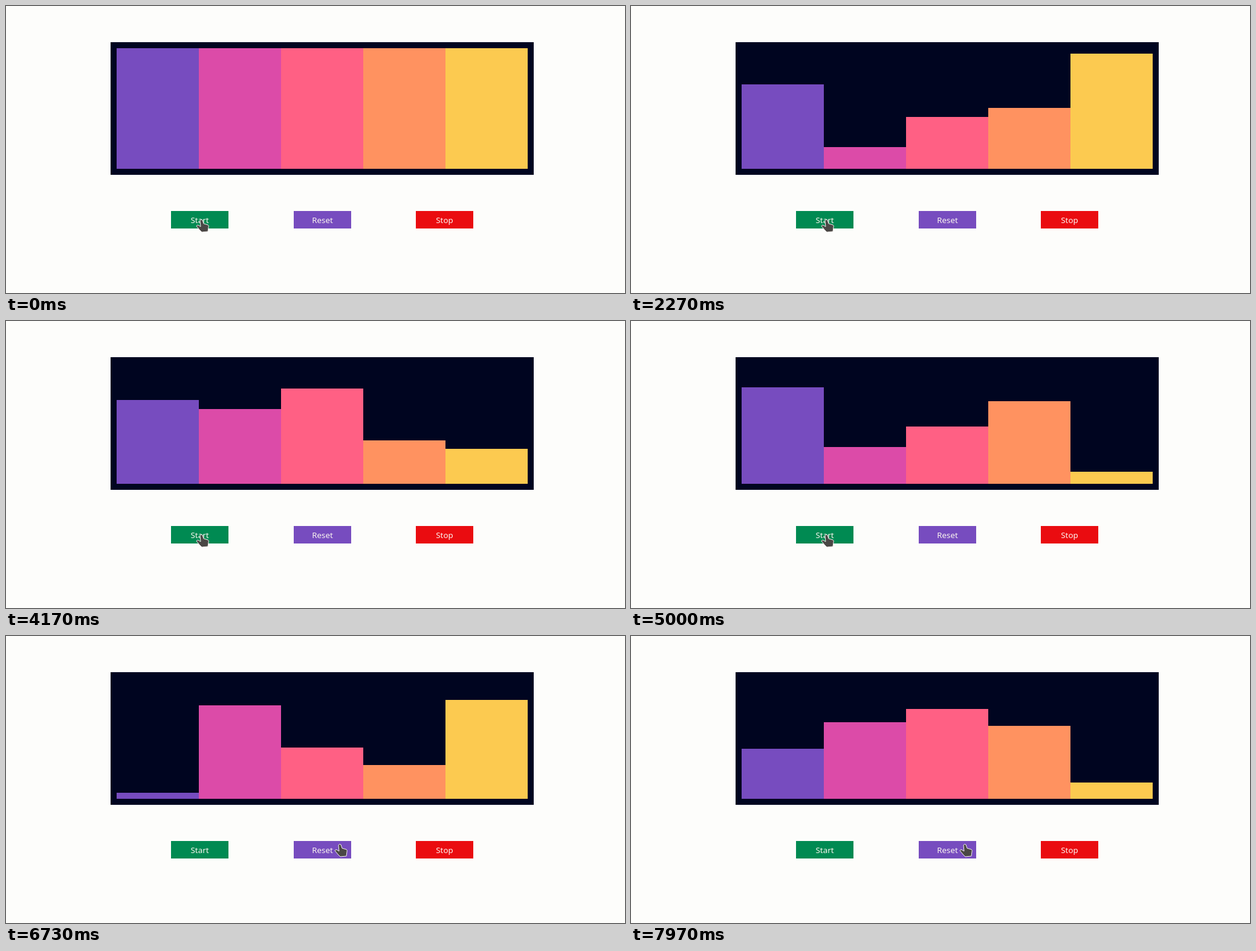
Write an HTML page with a canvas that moves like this. It is 1024 px wide and 476 px high and loops after 8 s.

```html
<!DOCTYPE html>
<html lang="en">
<head>
<meta charset="utf-8">
<title>Bars</title>
<style>
html, body { margin: 0; width: 100%; height: 100%; overflow: hidden; background: #fdfdfb; }
canvas { display: block; }
</style>
</head>
<body>
<canvas id="stage" width="1024" height="476"></canvas>
<script>
const ctx = document.getElementById('stage').getContext('2d');
const LOOP = 8000, START = 1345, STEP = 900;
const FULL = 200, BAR_W = 136, BASE = 270;
const PURPLE = '#774cbf';

// Bars wait at full height, then ease from one key height to the next.
const keySteps = [0, 1, 2, 3, 5, 6, 8];
const bars = [
  { color: PURPLE, keys: [FULL, 140, 117, 138, 164, 10, 88] },
  { color: '#dc4ba8', keys: [FULL, 35, 108, 128, 48, 155, 125] },
  { color: '#ff6084', keys: [FULL, 87, 24, 162, 81, 85, 154] },
  { color: '#ff9260', keys: [FULL, 100, 164, 68, 151, 56, 126] },
  { color: '#fcca50', keys: [FULL, 192, 106, 61, 12, 164, 17] }
];

const buttons = [['Start', '#008a52'], ['Reset', PURPLE], ['Stop', '#ea0c10']];

const hand = new Path2D('M-2 2Q-1-1 2 1L4 7L11 9Q13 10 12 13L11 20L1 21L-3 17L-8 11Q-7 8-4 10L-1 12Z');

const clamp = v => Math.min(1, Math.max(0, v));
const lerp = (a, b, p) => a + (b - a) * p;
const inOut = p => p < 0.5 ? 4 * p ** 3 : 1 - 4 * (1 - p) ** 3;

// cubic-bezier(.25, .1, .25, 1), solved by bisection
function ease(p) {
  let lo = 0, hi = 1;
  for (let i = 0; i < 20; i++) {
    const s = (lo + hi) / 2;
    if (0.75 * s * (1 - s) + s ** 3 < p) lo = s; else hi = s;
  }
  const s = (lo + hi) / 2, r = 1 - s;
  return 0.3 * s * r * r + 3 * s * s * r + s ** 3;
}

function rect(x, y, w, h, color) {
  ctx.fillStyle = color;
  ctx.fillRect(x, y, w, h);
}

function drawBars(t) {
  rect(173, 60, 700, 220, '#000520');
  const u = Math.max(0, t - START) / STEP;
  const next = keySteps.findIndex(s => s > u);
  const from = keySteps[next - 1];
  const p = ease((u - from) / (keySteps[next] - from));
  bars.forEach(({ color, keys }, i) => {
    const h = Math.round(lerp(keys[next - 1], keys[next], p));
    rect(183 + i * BAR_W, BASE - h, BAR_W, h, color);
  });
}

function drawButtons() {
  ctx.font = '13.333px "Noto Sans", "Open Sans", sans-serif';
  ctx.textAlign = 'center';
  buttons.forEach(([label, color], i) => {
    const x = Math.round(273 + i * 202.5);
    rect(x, 340, 95, 29, color);
    ctx.fillStyle = '#fbf6f0';
    ctx.fillText(label, x + 47.5, 360);
  });
}

function drawCursor(t) {
  const p = inOut(clamp((t - 5750) / 610));
  ctx.save();
  ctx.translate(Math.round(lerp(323, 552, p)), Math.round(lerp(354, 345, p)));
  ctx.fillStyle = '#4a4745';
  ctx.strokeStyle = '#f4f0ec';
  ctx.lineJoin = 'round';
  ctx.fill(hand);
  ctx.stroke(hand);
  ctx.restore();
}

let origin;
function draw(now) {
  origin ??= now;
  const t = Math.max(0, now - origin) % LOOP;
  rect(0, 0, 1024, 476, '#fdfdfb');
  drawBars(t);
  drawButtons();
  drawCursor(t);
  requestAnimationFrame(draw);
}
draw(performance.now());
</script>
</body>
</html>
```
